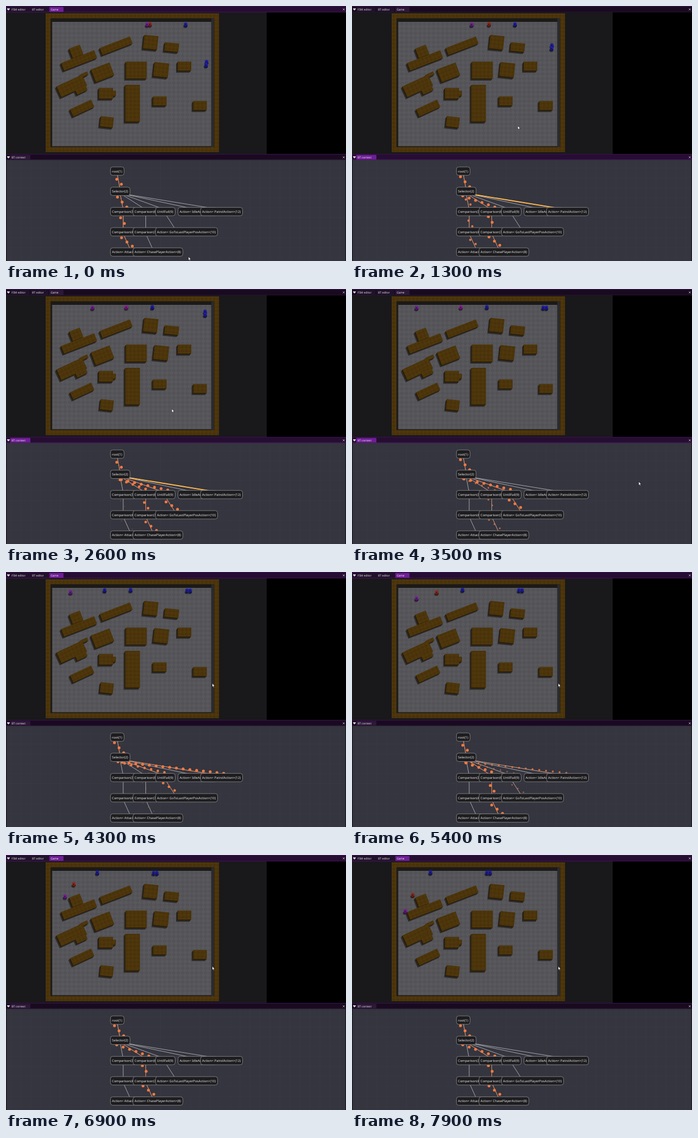
An HTML page that plays this animation: 600 px wide and 450 px high, repeating every 8000 ms.

```html
<!DOCTYPE html>
<html lang="en">
<head>
<meta charset="utf-8">
<title>Behaviour tree debugger</title>
<style>
  html, body { margin: 0; width: 100%; height: 100%; overflow: hidden; background: #000; }
  svg { display: block; width: 600px; height: 450px; }
  text { font-family: "Noto Sans", "Open Sans", sans-serif; fill: #e6e6e6; text-rendering: geometricPrecision; }
  .ui { font-size: 4.9px; }
  .node { font-size: 5.75px; }
</style>
</head>
<body>
<svg id="stage" viewBox="0 0 600 450" xmlns="http://www.w3.org/2000/svg">
  <defs>
    <pattern id="tiles" width="8" height="8" patternUnits="userSpaceOnUse">
      <rect width="8" height="8" fill="#525257"/>
      <path d="M4 0L8 4L4 8L0 4Z" fill="#58585d"/>
    </pattern>
    <pattern id="wood" width="7" height="7" patternUnits="userSpaceOnUse">
      <rect width="7" height="7" fill="#4f370c"/>
      <path d="M3.5 0L7 3.5L3.5 7L0 3.5Z" fill="#49320a"/>
    </pattern>
    <pattern id="grid" x="8" y="285" width="17.6" height="17.6" patternUnits="userSpaceOnUse">
      <rect width="17.6" height="17.6" fill="#34353e"/>
      <path d="M0 0H17.6M0 0V17.6" stroke="#3b3c46" stroke-width=".8"/>
    </pattern>
  </defs>
</svg>
<script>
const LOOP = 8000, STEP = 100;
const stage = document.getElementById('stage');

function add(tag, attrs, parent = stage) {
  const el = document.createElementNS(stage.namespaceURI, tag);
  set(el, attrs);
  parent.appendChild(el);
  return el;
}
function set(el, attrs) {
  for (const k in attrs) el.setAttribute(k, attrs[k]);
}
const rect = (x, y, width, height, fill, more) => add('rect', { x, y, width, height, fill, ...more });
function label(x, y, string, cls) {
  const el = add('text', { x, y, class: cls });
  el.textContent = string;
  return el;
}
const mix = (a, b, k) => a.map((v, i) => v + (b[i] - v) * k);

// Point at a given distance along a polyline.
function walk(points, distance) {
  for (let i = 1; i < points.length; i++) {
    const [a, b] = [points[i - 1], points[i]];
    const length = Math.hypot(b[0] - a[0], b[1] - a[1]);
    if (distance <= length) return mix(a, b, distance / length);
    distance -= length;
  }
  return points[points.length - 1];
}

// Game view
rect(0, 11, 460, 251, '#19181b');
rect(460, 11, 140, 251, '#000');
rect(70, 13, 306, 245, 'url(#wood)');
rect(78.5, 21.5, 289, 227.5, '#1c1a18');
rect(81.5, 28, 281, 219.5, 'url(#tiles)');
rect(362.5, 22, 4.5, 227, '#2b2a2c');

// Boxes by rotation: centre x, centre y, width, height.
const districts = [
  [-21, [[194.5, 70, 57, 13.5], [129, 96, 62.5, 14.5], [124, 80, 20, 18], [170.5, 117, 35, 24]]],
  [-25, [[116, 141, 50, 21], [132, 146, 20, 14], [138, 121, 14, 6], [134.5, 180, 41, 14]]],
  [0, [[230, 113, 37, 30], [315, 106, 24, 16], [176.5, 154, 25, 19], [190, 154, 8, 9],
       [223.5, 171.5, 26, 65], [271.5, 167.5, 24, 16], [342.5, 175.5, 24, 16]]],
  [6, [[255.5, 64, 25, 24], [292.5, 72.5, 25, 15], [274, 112.5, 26, 25], [178, 204.5, 23, 18]]]
];
for (const depth of [3, 2, 1, 0]) {
  const fill = ['url(#wood)', '#251904', '#2a2823', '#2f2f33'][depth];
  const layer = add('g', { fill, transform: `translate(${-depth} ${depth * 1.25})` });
  for (const [angle, boxes] of districts) {
    for (const [x, y, width, height] of boxes) {
      add('rect', { x: -width / 2, y: -height / 2, width, height, transform: `translate(${x} ${y}) rotate(${angle})` }, layer);
    }
  }
}

const PACE = 0.0226, SPRINT = 0.045;
const RED = ['#8a2a1c', '#4c160f'], BLUE = ['#20209c', '#101058'];
const PURPLE = ['#70208f', '#3c1050'], MAGENTA = ['#86208c', '#4a104e'];
const steady = t => PACE * t;
// The player sprints to the corner, then pulls away from rest.
function flee(t) {
  const run = SPRINT * Math.max(0, t - 460), rest = Math.max(0, t - 3440) / 1000;
  return Math.min(135, run) + 3.5 * rest * rest;
}
const agents = [
  { color: () => BLUE, path: [[317, 32.5], [136, 30.5]], travel: steady },
  { color: () => BLUE, path: [[354, 98.5], [351, 33], [237, 31]], travel: steady },
  { color: () => BLUE, path: [[353, 104], [351, 33], [237, 31]], travel: steady },
  { color: t => t < 2400 ? RED : t < 4000 ? MAGENTA : t < 4500 ? BLUE : RED,
    path: [[254, 32], [170, 32], [150, 35.5], [120, 50.5], [106, 72]],
    travel: t => PACE * Math.max(0, t - 760) },
  { color: () => PURPLE, path: [[249, 32.5], [114, 33], [114, 48], [92, 104]], travel: flee }
];
for (const a of agents) {
  a.el = add('g', {});
  add('ellipse', { cx: -0.8, cy: 3.6, rx: 3.4, ry: 2.8, fill: '#2a2a2e' }, a.el);
  a.body = add('circle', { cx: 0.4, cy: 2.2, r: 3 }, a.el);
  a.head = add('circle', { cx: 0, cy: -0.4, r: 3.1 }, a.el);
  a.core = add('circle', { cx: -0.3, cy: 0.6, r: 1.4 }, a.el);
}

// Graph view
rect(0, 271, 600, 179, '#1a1a1e');
rect(1.3, 271, 597.4, 179, 'url(#grid)');
const linkLayer = add('g', {}), dotLayer = add('g', {});

const FADE = 2000, GAP = 12, FLOW = 0.06, ROW = 35.7, COLUMN = 39.75, BOX = 14.8;
// Spans are the [start, end] times during which a branch runs.
const branches = {
  root: { phase: 10.3, spans: [[0, LOOP]] },
  attack: { phase: 3.6, spans: [[0, 700]] },
  chase: { phase: 7.2, spans: [[700, 2400], [4500, LOOP]] },
  search: { phase: 9.4, spans: [[2400, 4000]] },
  idle: { phase: 0, spans: [] },
  patrol: { phase: 5, spans: [[4000, 4500]] }
};
const links = [];

function node(name, column, parent, branch) {
  const row = parent ? parent.row + 1 : 0;
  const x = 184 + COLUMN * column, y = 284 + ROW * row;
  const box = rect(x + 0.3, y, 0, BOX, '#1d1d20', { rx: 4, stroke: '#8d8d90', 'stroke-width': 0.8 });
  const width = label(x + 3, y + 9.5, name, 'node').getComputedTextLength() + 6;
  set(box, { width });
  const self = { row, y, pin: x + Math.min(width / 2, 36) };
  if (parent) links.push(link(parent, self, branch));
  return self;
}

function link(from, to, branch) {
  const line = { x1: from.pin, y1: from.y + BOX - 4, x2: to.pin, y2: to.y + 4 };
  add('line', { ...line, stroke: '#c9c9cc', 'stroke-width': 0.75 }, linkLayer);
  const glow = add('line', { ...line, stroke: '#f0763c', 'stroke-width': 0.9 }, linkLayer);
  const dots = add('path', { stroke: '#f87a42', fill: 'none', 'stroke-linecap': 'round' }, dotLayer);
  // Markers run a little wider than the line itself.
  const start = [from.pin - 7, from.y + BOX], end = [to.pin + 7, to.y];
  const { phase, spans } = branches[branch];
  return { line, glow, dots, start, end, spans, phase: phase + 0.8 * (from.row - 1) };
}

const root = node('root(1)', 0);
const selector = node('Selector(2)', 0, root, 'root');
const near = node('Comparison(3)', 0, selector, 'attack');
const ready = node('Comparison(4)', 0, near, 'attack');
node('Action< AttackAction>(5)', 0, ready, 'attack');
const seen = node('Comparison(6)', 1, selector, 'chase');
const far = node('Comparison(7)', 1, seen, 'chase');
node('Action< ChasePlayerAction>(8)', 1, far, 'chase');
const until = node('UntilFail(9)', 2, selector, 'search');
node('Action< GoToLastPlayerPosAction>(10)', 2, until, 'search');
node('Action< IdleAction>(11)', 3, selector, 'idle');
node('Action< PatrolAction>(12)', 4, selector, 'patrol');
const selected = add('line', { ...links[links.length - 1].line, stroke: '#ffb64c', 'stroke-width': 1.9 }, linkLayer);

// Window bars and tabs
const ACTIVE = '#6f1e96';
function bar(y) {
  const el = rect(0, y, 600, 9.5);
  rect(0, y - 1, 600, 1.2, '#35124a');
  add('path', { d: `M2 ${y + 3.2}h4.6v1l-2.3 2.8l-2.3 -2.8z`, fill: '#dedede' });
  add('path', { d: `M594.4 ${y + 3.4}l3.2 3.2m0 -3.2l-3.2 3.2`, stroke: '#d8d8d8', 'stroke-width': 0.7 });
  return el;
}
function tab(x, y, w, name) {
  const el = rect(x, y + 0.8, w, 8.7, '#20122a', { rx: 1 });
  label(x + 2.4, y + 6.7, name, 'ui');
  return el;
}
const gameBar = bar(1);
tab(7.5, 1, 34, 'FSM editor');
tab(43.5, 1, 31, 'BT editor');
const gameWindow = { bar: gameBar, tab: tab(76.5, 1, 25, 'Game'), edge: rect(0, 10.3, 600, 0.9) };
const treeBar = bar(262);
const treeWindow = { bar: treeBar, tab: tab(7.5, 262, 35.5, 'BT context'), edge: rect(0, 270.6, 600, 0.8) };

function focus(win, on) {
  set(win.bar, { fill: on ? '#260d32' : '#190a20' });
  set(win.tab, { fill: on ? ACTIVE : '#2d1838' });
  set(win.edge, { fill: on ? '#4f176a' : '#2d1838' });
}

const cursor = add('path', {
  d: 'M0 0V6.2L1.4 5L2.4 7.2L3.4 6.7L2.5 4.6H4.3Z',
  fill: '#fff', stroke: '#111', 'stroke-width': 0.5
});
// Cursor moves: start, end, destination.
const cursorHome = [322, 442.5];
const cursorMoves = [
  [0, 500, [300, 348]], [500, 900, [292.5, 211.5]],
  [2700, 3300, [506, 340]], [3500, 4000, [364, 196.5]]
];
function cursorAt(t) {
  let at = cursorHome;
  for (const [start, end, to] of cursorMoves) {
    if (t > start) at = mix(at, to, Math.min(1, (t - start) / (end - start)));
  }
  return at;
}

function strength(spans, t) {
  const live = spans.filter(([start]) => t >= start);
  return Math.max(0, ...live.map(([, end]) => 1 - Math.max(0, t - end) / FADE));
}

function drawLink(l, t) {
  const k = strength(l.spans, t);
  const length = Math.hypot(l.end[0] - l.start[0], l.end[1] - l.start[1]);
  let d = '';
  if (k > 0) {
    for (let s = (l.phase + t * FLOW) % GAP; s < length; s += GAP) {
      d += `M${mix(l.start, l.end, s / length)}h.01`;
    }
  }
  set(l.glow, { 'stroke-opacity': k * 0.85 });
  set(l.dots, { d, 'stroke-width': 5 * (1 + 2 * k) / 3, 'stroke-opacity': Math.min(1, 0.25 + k) });
}

function draw(t) {
  for (const a of agents) {
    const [light, dark] = a.color(t);
    set(a.el, { transform: `translate(${walk(a.path, a.travel(t))})` });
    set(a.head, { fill: light });
    set(a.body, { fill: dark });
    set(a.core, { fill: dark });
  }
  for (const l of links) drawLink(l, t);
  set(selected, { visibility: t >= 500 && t < 3300 ? 'visible' : 'hidden' });

  const inTree = t >= 500 && t < 3900;
  focus(gameWindow, !inTree);
  focus(treeWindow, inTree);
  set(cursor, { transform: `translate(${cursorAt(t)})` });
}

function tick() {
  draw(Math.floor(performance.now() / STEP) * STEP % LOOP);
  requestAnimationFrame(tick);
}
tick();
</script>
</body>
</html>
```
